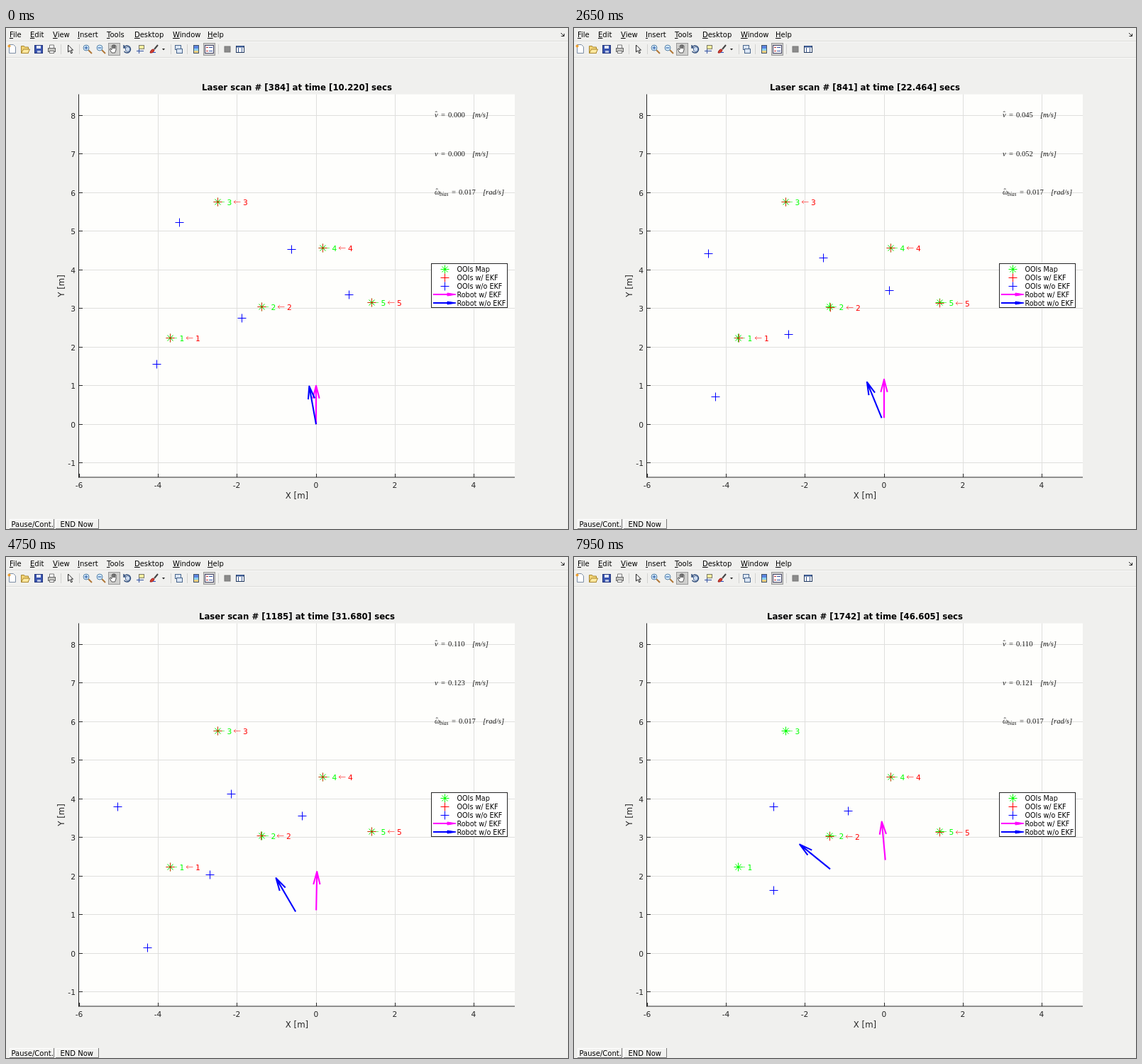
Write an HTML page that moves like this. It is 792 by 707 pixels and loops after 8000 ms.

```html
<!DOCTYPE html>
<html lang="en">
<head>
<meta charset="utf-8">
<title>Laser scan</title>
<style>
  html, body { margin: 0; width: 100%; height: 100%; overflow: hidden; background: #f0f0ee; }
  svg { display: block; width: 792px; height: 707px; font-family: "DejaVu Sans", sans-serif; }
  .ui { font-size: 10px; }
  .hot { text-decoration: underline; }
  .tick { font-size: 10.67px; fill: #262626; }
  .label { font-size: 11.73px; fill: #262626; text-anchor: middle; }
  .title { font-size: 11.73px; font-weight: bold; text-anchor: middle; }
  .key { font-size: 9.6px; }
  .ooi { font-size: 10.67px; }
  .math { font-family: "Liberation Serif", serif; font-size: 10.6px; fill: #1a1a1a; }
  .it { font-style: italic; }
  .sub { font-style: italic; font-size: 7.5px; }
</style>
</head>
<body>
<svg id="stage" viewBox="0 0 792 707"></svg>
<script>
const stage = document.getElementById('stage');
const GREEN = '#00ff00', RED = '#ff0000', BLUE = '#0000ff', MAGENTA = '#ff00ff';
const INK = '#262626', GRID = '#dfdfdd';
const LOOP = 8000, STEP = 50;

function add(tag, attrs, text, parent = stage) {
  const el = document.createElementNS('http://www.w3.org/2000/svg', tag);
  for (const k in attrs) el.setAttribute(k, attrs[k]);
  if (text !== undefined) el.textContent = text;
  parent.appendChild(el);
  return el;
}
const write = (x, y, text, cls, more = {}, parent = stage) =>
  add('text', { x, y, class: cls, ...more }, text, parent);
const box = (x, y, width, height, fill, stroke = 'none') =>
  add('rect', { x, y, width, height, fill, stroke });
const draw = (d, stroke, more = {}, parent = stage) =>
  add('path', { d, stroke, fill: 'none', ...more }, undefined, parent);
const moveTo = (el, x, y) => el.setAttribute('transform', `translate(${x} ${y})`);
const px = x => 437 + 55.65 * x;
const py = y => 559.2 - 54.47 * y;
const crisp = v => Math.floor(v) + .5;

// Menu bar
box(0, 0, 792, 707, '#f0f0ee');
const menus = { File: 5, Edit: 34, View: 66, Insert: 101, Tools: 142, Desktop: 181, Window: 235, Help: 284 };
for (const name in menus) {
  const item = write(menus[name], 13, undefined, 'ui');
  add('tspan', { class: 'hot' }, name[0], item);
  add('tspan', {}, name.slice(1), item);
}
draw('M782 7l4 4M786.5 8v3.5h-4', '#222');
draw('M0 18.5H792M0 41.5H792', '#dcdcda');
draw('M0 19.5H792M0 42.5H792', '#f9f9f8');

// Toolbar
for (const x of [77.5, 103.5, 232.5, 255.5, 299.5]) draw(`M${x} 23v14`, '#d2d2d0');
for (const x of [144.5, 278.5]) box(x, 21.5, 16, 17, '#d0d0ce', '#999');
draw('M4.5 23.5h6l3 3v9h-9z', '#7d8ea5', { fill: '#fff' });
add('circle', { cx: 4.5, cy: 25.5, r: 2, fill: '#f0a030' });
draw('M21.5 35.5v-10h4l1 1.5h5v8.5z', '#a8862c', { fill: '#f3d477' });
draw('M21.5 35.5l3-5.5h9l-2.5 5.5z', '#a8862c', { fill: '#ffe9a0' });
box(40.5, 24.5, 11, 11, '#3a55b0', '#22357c');
box(43, 25, 6, 4, '#e4e9f7');
box(44, 32, 5, 3, '#b9c4e4');
draw('M61.5 29v-5h6v5', '#777', { fill: '#fff' });
box(59.5, 28.5, 10, 5, '#c4c4c0', '#666');
box(61.5, 32.5, 6, 3, '#fff', '#777');
draw('M87.5 24v10l2.3-2.2 2 4 1.7-.8-2-3.8h3z', '#222', { fill: '#fff' });
for (const [x, sign] of [[113, 'h5m-2.5 -2.5v5'], [132, 'h5']]) {
  draw(`M${x + 3} 31l5 5`, '#b07838', { 'stroke-width': 2 });
  add('circle', { cx: x, cy: 28, r: 4, fill: '#d5ebfa', stroke: '#5c86aa' });
  draw(`M${x - 2.5} 28${sign}`, '#1c4fa0');
}
draw('M149 35l-3-5 1-1 2 2v-6h1.5v4-5h1.5v5-5h1.5v5-4h1.5v6l-1.5 4z', '#555', { fill: '#fff' });
draw('M166.5 27a5 5 0 1 1 0 6M166 24v4h4', '#34517e', { 'stroke-width': 1.5 });
draw('M168.5 28l3-1.5 3 1.5v4l-3 1.5-3-1.5z', '#55709b', { fill: '#cddcf0' });
draw('M184 32.5h10M187.5 27v9', '#2f4fa0');
box(187.5, 24.5, 7, 5, '#fff3a0', '#777766');
draw('M209 30l5-6', '#444', { 'stroke-width': 2 });
draw('M203 35q1-5 5-5l1 2q-2 4-6 3z', '#a02020', { fill: '#d04030' });
draw('M207 34.5h4', '#2850c0');
draw('M220 29h4l-2 2.5z', 'none', { fill: '#222' });
box(238.5, 24.5, 8, 6, '#dbe6f4', '#48658c');
box(240.5, 29.5, 8, 6, '#dbe6f4', '#48658c');
box(264.5, 24.5, 7, 11, '#8ad0f0', '#445566');
box(265, 25, 6, 4, '#5c84e0');
box(265, 32, 6, 3, '#f0d080');
box(280.5, 24.5, 12, 11, '#fff', '#444466');
draw('M282 27.5h3M282 32.5h3', '#c03030');
draw('M286 27.5h5M286 32.5h5', '#3050a0');
box(308, 26, 8, 8, '#8b8b8b', '#777');
box(324.5, 25.5, 11, 9, '#fff', '#23395f');
box(325, 25, 10, 2.5, '#3b5a92');
draw('M327.5 28v6M332.5 28v6', '#3b5a92');

// Axes
box(103, 93.5, 614, 541, '#fefefc');
for (let x = -6; x <= 4; x += 2) {
  const p = crisp(px(x));
  if (x > -6) draw(`M${p} 93.5V634`, GRID);
  draw(`M${p} 634v-5`, INK);
  write(p - .5, 649, x, 'tick', { 'text-anchor': 'middle' });
}
for (let y = -1; y <= 8; y++) {
  const p = crisp(py(y));
  draw(`M103 ${p}H717`, GRID);
  draw(`M103 ${p}h5`, INK);
  write(98, p + 4, y, 'tick', { 'text-anchor': 'end' });
}
draw('M102.5 93.5V634.5', INK);
draw('M102 634H717', INK);
write(410, 664, 'X [m]', 'label');
write(0, 0, 'Y [m]', 'label', { transform: 'translate(82 364) rotate(-90)' });
const title = write(410, 87.5, '', 'title');

// Readouts
function readout(y, symbol, hat, sub, unit) {
  const text = write(0, y, undefined, 'math');
  const shift = sub ? 15 : 0;
  const span = (x, s, cls = '') => add('tspan', { x, class: cls }, s, text);
  span(604, symbol, 'it');
  span(613 + shift, '=');
  const number = span(623 + shift, '0.017');
  const tail = span(657 + shift, unit, 'it');
  if (hat) write(sub ? 605.5 : 604.5, y - 1, 'ˆ', 'math');
  if (sub) add('tspan', { x: 611, y: y + 1.5, class: 'sub' }, sub, text);
  return value => {
    const s = value.toFixed(3);
    number.textContent = s.replace('-', '−');
    tail.setAttribute('x', 657 + shift + (s[0] === '-' ? 8.5 : 0));
  };
}
const showEstimate = readout(126, 'v', true, '', '[m/s]');
const showSpeed = readout(180.5, 'v', false, '', '[m/s]');
readout(235, 'ω', true, 'bias', '[rad/s]');

// Markers
const plus = 'M-6 0H6M0 -6V6';
const star = plus + 'M-4 -4L4 4M-4 4L4 -4';
function tag(x, id, color, parent) {
  draw(`M${x} 0h9.5m-6.5 -2.5l-3 2.5l3 2.5`, color, { 'stroke-width': .8, opacity: .7 }, parent);
  write(x + 13, 4, id, 'ooi', { fill: color }, parent);
}
const landmarks = [[-3.70, 2.226], [-1.375, 3.043], [-2.49, 5.75], [.17, 4.567], [1.41, 3.153]]
  .map(([x, y], i) => ({ x, y, id: i + 1, px: crisp(px(x)), py: crisp(py(y)) }));
for (const m of landmarks) {
  const fixed = add('g', {});
  moveTo(fixed, m.px, m.py);
  draw(star, GREEN, {}, fixed);
  tag(0, m.id, GREEN, fixed);
}
for (const m of landmarks) {
  m.seen = add('g', {});
  draw(plus, RED, { opacity: .8 }, m.seen);
  tag(22.5, m.id, RED, m.seen);
  m.raw = draw(plus, BLUE);
}
const arrowStyle = { 'stroke-width': 2.1, 'stroke-linejoin': 'round' };
const fusedArrow = draw('', MAGENTA, arrowStyle);
const rawArrow = draw('', BLUE, arrowStyle);

// Legend
box(599.5, 332.5, 107, 62, '#fff', INK);
['OOIs Map', 'OOIs w/ EKF', 'OOIs w/o EKF', 'Robot w/ EKF', 'Robot w/o EKF'].forEach((name, i) => {
  const y = 340 + 12 * i, color = [GREEN, RED, BLUE, MAGENTA, BLUE][i];
  write(635.5, y + 3.5, name, 'key');
  if (i < 3) moveTo(draw(i ? plus : star, color), 618.5, y + .5);
  else {
    draw(`M602 ${y}H632`, color, { 'stroke-width': 2.1 });
    draw(`M622 ${y - 2}L634 ${y}L622 ${y + 2}z`, color, { fill: color });
  }
});

// Buttons
for (const [x, w, name] of [[5, 63, 'Pause/Cont.'], [70, 61, 'END Now']]) {
  box(x, 693, w, 14, '#f2f2f0');
  draw(`M${x + .5} 707V693.5H${x + w}`, '#fff');
  draw(`M${x + w - .5} 693V706.5H${x}`, '#777');
  write(name === 'END Now' ? 76.5 : 7.5, 704, name, 'ui');
}

// Playback speed varies a little: [ms, scan, seconds]
const clock = [[0, 384, 10.22], [1150, 601, 16.009], [2650, 841, 22.464], [3900, 1042, 27.826],
  [5600, 1327, 35.535], [6800, 1537, 41.136], [7950, 1742, 46.605]];
function scanAt(ms) {
  const i = Math.max(1, clock.findIndex(k => k[0] >= ms));
  const a = clock[i - 1], b = clock[i], f = (ms - a[0]) / (b[0] - a[0]);
  return [1, 2].map(k => a[k] + (b[k] - a[k]) * f);
}

const ramp = (ms, from, to) => Math.max(0, Math.min(1, (ms - from) / (to - from)));
const ease = (ms, from, to) => { const f = ramp(ms, from, to); return f * f * (3 - 2 * f); };

// Rest, creep, cruise, stop, cruise again
const speedAt = ms => .052 * ramp(ms, 1870, 1920) + .071 * ramp(ms, 2650, 3420)
  - .122 * ramp(ms, 5450, 5500) + .12 * ramp(ms, 6190, 6240);
const headingAt = ms => -4.2 * ease(ms, 3900, 6500) + 9.4 * ease(ms, 6800, 7950);
const driftAt = secs => .965 * secs + .17;

function turn(x, y, degrees) {
  const a = degrees * Math.PI / 180;
  return [x * Math.cos(a) - y * Math.sin(a), x * Math.sin(a) + y * Math.cos(a)];
}

// Dead reckoning: the raw pose follows the drifting gyro, the fused one does not
const FUSED_GAIN = .93, ESTIMATE_GAIN = .9, LAG = 1.2;
const states = [];
let fused = [0, 0], raw = [0, 0], filtered = 0, lastSecs = 10.22;
for (let ms = 0; ms < LOOP; ms += STEP) {
  const [scan, secs] = scanAt(ms);
  const dt = secs - lastSecs, speed = speedAt(ms);
  const heading = headingAt(ms), drift = driftAt(secs);
  const advance = ([x, y], d, angle) => { const [u, v] = turn(0, d, angle); return [x + u, y + v]; };
  fused = advance(fused, speed * dt * FUSED_GAIN, heading);
  raw = advance(raw, speed * dt, heading + drift);
  filtered += (speed * ESTIMATE_GAIN - filtered) * (1 - Math.exp(-dt / LAG));
  const estimate = filtered - .001 * Math.sin(ms / 700);
  states.push({ ms, scan, secs, speed, estimate, heading, drift, fused, raw });
  lastSecs = secs;
}

function placeArrow(el, [x, y], heading) {
  const at = (dx, dy) => {
    const [u, v] = turn(dx, dy, heading);
    return px(x + u).toFixed(2) + ' ' + py(y + v).toFixed(2);
  };
  const tip = at(0, 1);
  el.setAttribute('d', `M${at(0, 0)}L${tip}M${at(-.083, .67)}L${tip}L${at(.083, .67)}`);
}
function visible(id, ms) {
  if (id === 1) return ms < 6250;
  if (id === 3) return ms < 3250 || ms >= 4100 && ms < 7450;
  return true;
}
// Seeded noise of the corrected detections: mostly 0, at times one pixel
function jitter(seed) {
  const r = Math.sin(seed * 12.9898) * 43758.5453;
  return Math.round((r - Math.floor(r) - .5) * 1.4);
}

function render({ ms, scan, secs, speed, estimate, heading, drift, fused, raw }) {
  title.textContent = `Laser scan # [${Math.round(scan)}] at time [${secs.toFixed(3)}] secs`;
  showEstimate(estimate);
  showSpeed(speed);
  placeArrow(fusedArrow, fused, heading);
  placeArrow(rawArrow, raw, heading + drift);

  for (const m of landmarks) {
    m.seen.style.display = m.raw.style.display = visible(m.id, ms) ? '' : 'none';
    const [u, v] = turn(m.x - fused[0], m.y - fused[1], drift);
    moveTo(m.raw, crisp(px(raw[0] + u)), crisp(py(raw[1] + v)));
    const noise = speed > 0 ? 1 : 0, seed = ms / STEP + m.id * 211;
    moveTo(m.seen, m.px + noise * jitter(seed), m.py + noise * jitter(seed + 77));
  }
}

const start = performance.now();
function tick() {
  const ms = (performance.now() - start) % LOOP;
  render(states[Math.floor(ms / STEP)]);
  requestAnimationFrame(tick);
}
tick();
</script>
</body>
</html>
```
